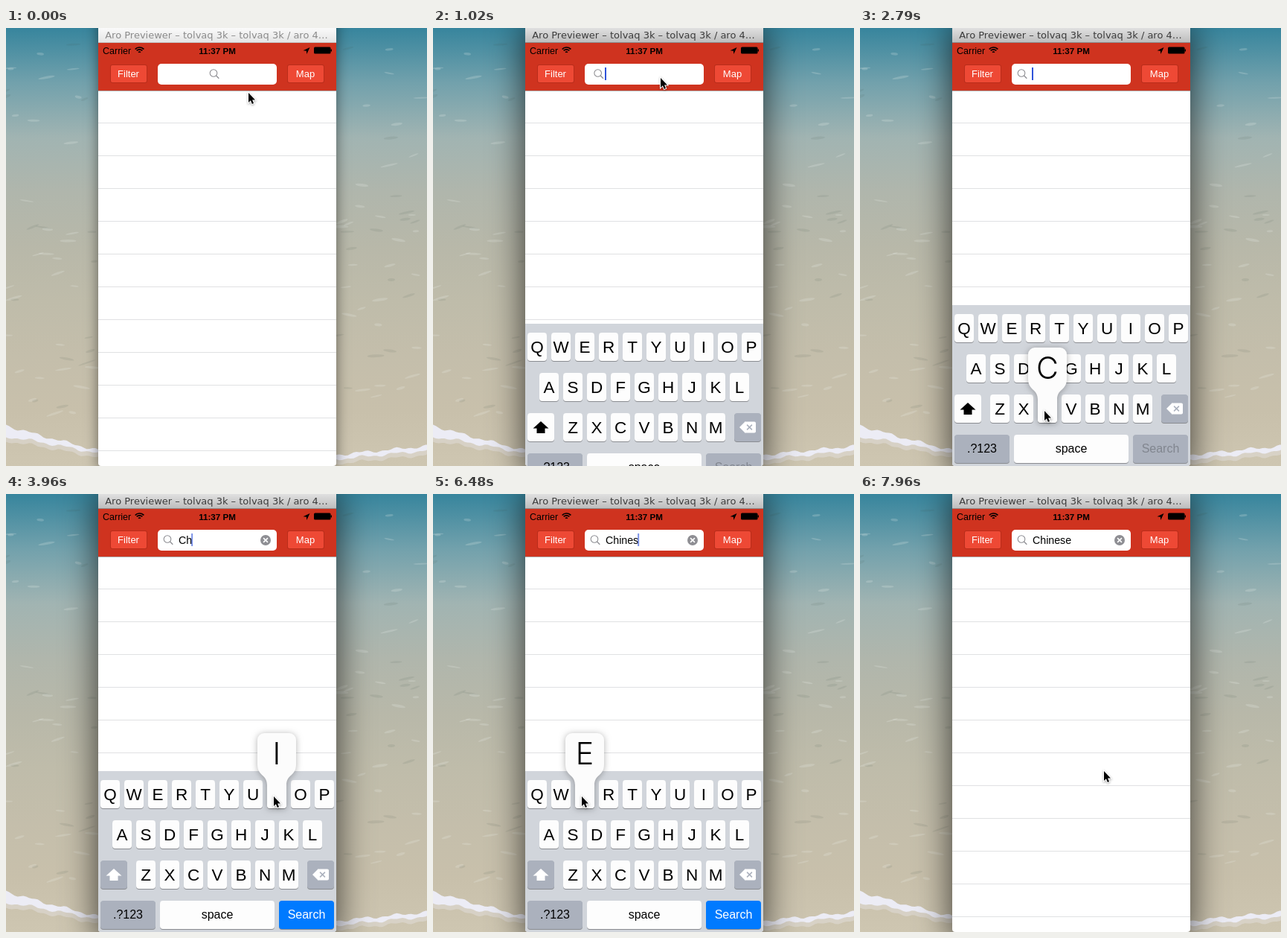
An HTML page with a canvas for the animation above (8 s loop, 566 px wide and 588 px high).

```html
<!DOCTYPE html>
<html lang="en">
<head>
<meta charset="utf-8">
<title>Search field demo</title>
<style>
html, body { margin: 0; width: 100%; height: 100%; overflow: hidden; }
canvas { display: block; width: 566px; height: 588px; }
</style>
</head>
<body>
<canvas id="stage"></canvas>
<script>
const W = 566, H = 588, LOOP = 8000, STEP = 147.4, LEAD = 26;
const WIN = { x: 124, w: 320 };
const SANS = '"Liberation Sans", Arial, sans-serif';
const RED = '#cf331f', GREY = '#abb1bd', ICON = '#8e8e93', KEY = '#fdfdfd';
const KB_TOP = 372, KB_H = 216, KB_RATE = 1.08;
const TITLE = 'Aro Previewer – tolvaq 3k – tolvaq 3k / aro 4…';
const WORD = 'Chinese';

// Times in steps
const ACTIVE_AT = 4, SLIDE_AT = 5, SUBMIT_AT = 51, END = 54;
const PRESSES = [...WORD].map((_, i) => Math.round(18.65 + 4.3 * i));

const KEYS = ['QWERTYUIOP', 'ASDFGHJKL', 'ZXCVBNM'].flatMap((row, r) =>
  [...row].map((letter, i) => ({ letter, x: 287 - row.length * 16 + i * 32, y: 384 + r * 54 })));

// The pointer rests on each key around its press
const STOPS = [
  { x: 326, y: 87, arrive: 0, leave: 1 },
  { x: 306, y: 67, arrive: 4, leave: 7 },
  ...PRESSES.map((p, i) => {
    const k = KEYS.find(k => k.letter === WORD[i].toUpperCase());
    return { x: k.x + 9, y: k.y + 22, arrive: p - 2, leave: p + 1 };
  }),
  { x: 398, y: 561, arrive: SUBMIT_AT - 2, leave: SUBMIT_AT + 1 },
  { x: 328, y: 372, arrive: END }
];

const canvas = document.getElementById('stage');
const dpr = window.devicePixelRatio || 1;
canvas.width = W * dpr;
canvas.height = H * dpr;
const c = canvas.getContext('2d');
c.scale(dpr, dpr);

const clamp = v => Math.min(1, Math.max(0, v));
const easeOut = k => 1 - (1 - k) ** 3.5;

function rect(x, y, w, h, fill) {
  c.fillStyle = fill;
  c.fillRect(x, y, w, h);
}

function round(x, y, w, h, r, fill) {
  c.beginPath();
  c.roundRect(x, y, w, h, r);
  c.fillStyle = fill;
  c.fill();
}

function poly(points, fill) {
  c.beginPath();
  points.forEach(([x, y]) => c.lineTo(x, y));
  c.closePath();
  c.fillStyle = fill;
  c.fill();
}

function line(x1, y1, x2, y2, color, width) {
  c.beginPath();
  c.moveTo(x1, y1);
  c.lineTo(x2, y2);
  c.strokeStyle = color;
  c.lineWidth = width;
  c.stroke();
}

function ring(x, y, r, from, to, color, width) {
  c.beginPath();
  c.arc(x, y, r, from, to);
  c.strokeStyle = color;
  c.lineWidth = width;
  c.stroke();
}

function cross(x, y, r, color) {
  line(x - r, y - r, x + r, y + r, color, 1.5);
  line(x - r, y + r, x + r, y - r, color, 1.5);
}

function text(str, x, y, font, fill, align = 'center') {
  c.font = font;
  c.textAlign = align;
  c.fillStyle = fill;
  c.fillText(str, x, y);
}

function shadow(color, blur, dy) {
  c.shadowColor = color;
  c.shadowBlur = blur * dpr;
  c.shadowOffsetY = dy * dpr;
}

function gradient(y0, y1, ...colors) {
  const g = c.createLinearGradient(0, y0, 0, y1);
  colors.forEach((color, i) => g.addColorStop(i / (colors.length - 1), color));
  return g;
}

function random(seed) {
  return () => (seed = (seed * 16807) % 2147483647) / 2147483647;
}

// Wavy strip that falls by `drop` and tapers from one thickness to another
function foam(x0, y0, drop, from, to, color) {
  const top = [], low = [];
  for (let i = 0; i <= 32; i++) {
    const u = i / 32, x = x0 + u * 124;
    const y = y0 + drop * u + Math.sin(u * 17) * 1.5;
    const half = (from + (to - from) * Math.sqrt(u)) / 2 + Math.sin(u * 41);
    top.push([x, y - half]);
    low.unshift([x, y + half]);
  }
  poly([...top, ...low], color);
}

function beach() {
  rect(0, 0, W, H, gradient(0, H, '#37859d', '#72a1ac', '#a1b4b2', '#b0b6ac',
    '#b8b8a9', '#bfbcaa', '#c4beab', '#c8c0ab', '#cec6b1'));
  const rnd = random(77);
  for (let i = 0; i < 90; i++) {
    const x = (i % 2 ? 444 : 0) + rnd() * 124, y = 20 + rnd() * 500;
    c.beginPath();
    c.ellipse(x, y, 4 + rnd() * 8, 1 + rnd(), rnd() * .6 - .4, 0, 7);
    c.fillStyle = i % 3 ? 'rgba(240,243,240,.2)' : 'rgba(70,85,80,.1)';
    c.fill();
  }
  for (const [color, dy, extra] of [['rgba(228,224,222,.5)', 4, 4], ['#ececf5', 0, 0]]) {
    foam(0, 541 + dy, 28, 17 + extra, 4 + extra, color);
    foam(444, 576 + dy, -12, 6 + extra, 6 + extra, color);
  }
}

function windowFrame(active) {
  c.save();
  shadow(active ? 'rgba(0,0,0,.72)' : 'rgba(0,0,0,.5)', active ? 48 : 18, active ? 16 : 5);
  round(WIN.x, -20, WIN.w, H + 20, 4, '#fff');
  c.restore();
  const [top, low, edge, ink] = active
    ? ['#e0e0e0', '#bcbcbc', '#8c8c8c', '#3c3c3c']
    : ['#fafafa', '#e4e4e4', '#c2c2c2', '#8b8b8b'];
  rect(WIN.x, 0, WIN.w, 20, gradient(0, 20, top, low));
  rect(WIN.x, 19, WIN.w, 1, edge);
  text(TITLE, 283, 14, '13px "DejaVu Sans", sans-serif', ink);
}

function statusBar() {
  rect(WIN.x, 20, WIN.w, 64, RED);
  rect(WIN.x, 84, WIN.w, 1, '#b2b2b2');
  text('Carrier', 130, 35, '12.5px ' + SANS, '#000', 'left');
  text('11:37 PM', 284, 35, 'bold 11.6px ' + SANS, '#000');
  for (const r of [8, 5.2, 2]) ring(179.5, 34, r, -Math.PI * .76, -Math.PI * .24, '#000', 1.7);
  poly([[408.5, 26], [399.5, 30.2], [403.8, 30.7], [404.3, 35]], '#000');
  round(414, 25.5, 22.5, 9, 1.5, '#000');
  rect(436.5, 28.5, 1.5, 3, '#000');
}

function barButton(label, x) {
  round(x, 49, 50, 25, 3, '#b92d1b');
  round(x + 1, 50, 48, 23, 2, '#ee4935');
  text(label, x + 24.5, 66, '13px ' + SANS, '#fff');
}

function searchField(offset, typed, caret) {
  round(204, 48, 160, 28, 5, '#fff');
  const shift = typed ? 0 : 62 * (offset / KB_H) ** 1.2;
  ring(217 + shift, 60.5, 4.8, 0, 7, ICON, 1.1);
  line(220.5 + shift, 64, 224.3 + shift, 67.8, ICON, 1.3);

  const word = WORD.slice(0, typed);
  text(word, 232, 67, '14.2px ' + SANS, '#000', 'left');
  c.globalAlpha = caret;
  rect(231 + c.measureText(word).width, 53, 2, 17, '#2f53d9');
  c.globalAlpha = 1;
  if (typed) {
    round(342, 55, 14, 14, 7, ICON);
    cross(349, 62, 2.9, '#fff');
  }
}

function key(x, y, w, fill = KEY) {
  round(x, y + 1, w, 38, 4, '#8a8c91');
  round(x, y, w, 38, 4, fill);
}

function wideKey(label, x, w, fill, ink = '#000') {
  key(x, 546, w, fill);
  text(label, x + w / 2, 570, '16px ' + SANS, ink);
}

function popup({ x, y, letter }) {
  const r = 9, left = x - 13, right = x + 39, top = y - 63;
  c.save();
  shadow('rgba(0,0,0,.3)', 8, 1);
  c.beginPath();
  c.moveTo(left + r, top);
  c.arcTo(right, top, right, top + 40, r);
  c.lineTo(right, top + 42);
  c.bezierCurveTo(right, top + 58, x + 26, top + 55, x + 26, top + 70);
  c.arcTo(x + 26, y + 38, x, y + 38, 4);
  c.arcTo(x, y + 38, x, y, 4);
  c.lineTo(x, top + 70);
  c.bezierCurveTo(x, top + 55, left, top + 58, left, top + 42);
  c.arcTo(left, top, left + r, top, r);
  c.fillStyle = '#fcfcfc';
  c.fill();
  c.restore();
  text(letter, x + 13, top + 42, '300 41px Inter, Roboto, sans-serif', '#000');
}

function keyboard(offset, typed, held, submit) {
  c.save();
  c.translate(0, offset);
  rect(WIN.x, KB_TOP, WIN.w, KB_H, '#d1d5db');
  for (const { letter, x, y } of KEYS) {
    key(x, y, 26);
    text(letter, x + 13, y + 27, '22.5px ' + SANS, '#000');
  }

  const arrow = typed ? '#fff' : '#000';
  key(127, 492, 36, typed ? GREY : KEY);
  poly([[145, 503], [155.5, 512.5], [134.5, 512.5]], arrow);
  rect(139.5, 512, 11, 7, arrow);

  key(405, 492, 36, GREY);
  poly([[412, 511], [419.5, 503.5], [419.5, 518.5]], '#fff');
  round(419, 503.5, 15, 15, [0, 2, 2, 0], '#fff');
  cross(425.5, 511, 3.4, GREY);

  wideKey('.?123', 127, 74, GREY);
  wideKey('space', 207, 154);
  if (submit) wideKey('Search', 367, 74);
  else if (typed) wideKey('Search', 367, 74, '#007aff', '#fff');
  else wideKey('Search', 367, 74, GREY, '#81868f');

  if (held) popup(KEYS.find(k => k.letter === held));
  c.restore();
}

function pointer(n) {
  const i = STOPS.findLastIndex(s => s.arrive <= n);
  const a = STOPS[i], b = STOPS[i + 1] || a;
  const k = a === b ? 0 : easeOut(clamp((n - a.leave) / (b.arrive - a.leave)));
  c.save();
  c.translate(a.x + (b.x - a.x) * k, a.y + (b.y - a.y) * k);
  c.beginPath();
  [[0, 0], [0, 13], [2.9, 10.2], [4.9, 15], [7, 14], [5.1, 9.5], [9, 9.5]]
    .forEach(([x, y]) => c.lineTo(x, y));
  c.closePath();
  c.lineWidth = 2;
  c.strokeStyle = '#fff';
  shadow('rgba(0,0,0,.35)', 3, 1);
  c.stroke();
  shadow('transparent', 0, 0);
  c.fillStyle = '#000';
  c.fill();
  c.restore();
}

// Solid after each key, then fades out and back in
function caretAlpha(n, typed) {
  if (n <= SLIDE_AT || n > SUBMIT_AT) return 0;
  const since = typed ? PRESSES[typed - 1] : SLIDE_AT;
  const u = (n - since - 1) * STEP % 900;
  return clamp(u < 625 ? (600 - u) / 250 : (u - 650) / 200);
}

function slideOffset(n) {
  const decay = from => Math.exp(-KB_RATE * Math.max(0, n - from));
  return Math.round(KB_H * (n < SUBMIT_AT ? decay(SLIDE_AT) : 1 - decay(SUBMIT_AT)));
}

function draw(n) {
  const typed = PRESSES.filter(p => p < n).length;
  const held = (WORD[PRESSES.indexOf(n)] || '').toUpperCase();
  const offset = n < END ? slideOffset(n) : KB_H;

  beach();
  windowFrame(n >= ACTIVE_AT);
  c.save();
  c.beginPath();
  c.roundRect(WIN.x, 0, WIN.w, H, [0, 0, 4, 4]);
  c.clip();
  statusBar();
  barButton('Filter', 140);
  barButton('Map', 378);
  searchField(offset, typed, caretAlpha(n, typed));
  for (let y = 127; y < H; y += 44) rect(WIN.x, y, WIN.w, 1, '#e0e1e3');
  keyboard(offset, typed, held, n === SUBMIT_AT);
  c.restore();
  pointer(n);
}

let last = -1;
const start = performance.now();
function tick() {
  const t = (performance.now() - start) % LOOP;
  const n = Math.min(END, Math.floor((t + LEAD) / STEP));
  if (n !== last) draw(last = n);
  requestAnimationFrame(tick);
}
tick();
</script>
</body>
</html>
```
